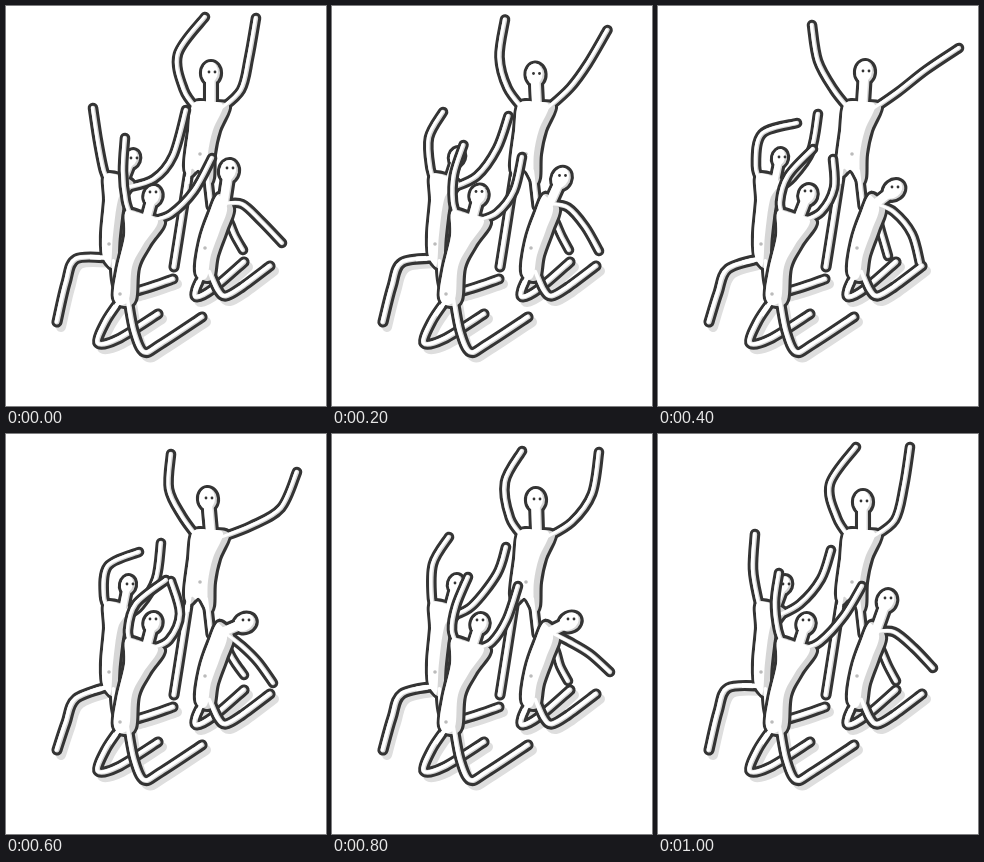
Recreate the animation shown at these times as an HTML page with a canvas. Size 320x400 px, loop 1100 ms.

```html
<!DOCTYPE html>
<html lang="en">
<head>
<meta charset="utf-8">
<title>Dancing figures</title>
<style>
html, body { margin: 0; width: 100%; height: 100%; overflow: hidden; background: #fff; }
canvas { display: block; }
</style>
</head>
<body>
<canvas id="stage" width="320" height="400"></canvas>
<script>
const ctx = document.getElementById('stage').getContext('2d');
const INK = '#343434', GREY = '#d6d6d6', LINE = 3.1, ARM = 4.4, LEG = 5;
const STEP = 100, STEPS = 11;
const KEYS = [0, 1, 3, 4, 6, 8, 10];

// Each pose: head x,y, then three points for the left arm and three for the right.
const back = {
  head: [9, 11], eyes: [1, -1], neck: [205, 98], navel: [194, 148],
  shoulders: [192, 104, 214, 104],
  torso: [187, 98, 183, 125, 179, 160, 184, 170, 193, 164, 202, 178, 207, 172, 208, 148, 213, 125, 223, 100, 205, 96],
  legs: () => [[184, 158, 176, 210, 168, 261], [201, 165, 205, 200]],
  poses: [
    [205, 67, 178, 84, 172, 48, 199, 11, 235, 84, 243, 52, 250, 12],
    [204, 69, 175, 82, 169, 50, 182, 11, 236, 84, 250, 55, 260, 14],
    [203, 68, 176, 82, 166, 52, 164, 16, 240, 80, 262, 60, 291, 34],
    [207, 66, 176, 84, 160, 55, 154, 19, 240, 86, 268, 64, 301, 42],
    [202, 65, 176, 82, 163, 55, 165, 20, 245, 92, 275, 74, 291, 38],
    [204, 66, 178, 84, 173, 48, 190, 17, 240, 88, 260, 60, 267, 18],
    [205, 68, 179, 84, 172, 50, 198, 13, 237, 86, 246, 52, 252, 13]
  ]
};
const left = {
  head: [7, 9], eyes: [2, -1], neck: [117, 176], navel: [103, 238],
  shoulders: [104, 178, 120, 182],
  torso: [100, 168, 99, 195, 96, 230, 98, 253, 110, 262, 113, 230, 118, 195, 127, 176],
  legs: knee => [[104, 252, 70, knee, 60, knee + 24, 51, 316], [108, 255, 112, 283, 130, 285, 167, 273]],
  poses: [
    [126, 153, 98, 165, 92, 135, 87, 102, 148, 173, 167, 150, 180, 104],
    [129, 152, 99, 165, 92, 135, 96, 101, 150, 170, 172, 143, 187, 110],
    [121, 150, 98, 160, 102, 128, 126, 111, 140, 170, 158, 142, 166, 110],
    [122, 152, 98, 160, 104, 128, 139, 117, 134, 172, 153, 145, 160, 108],
    [122, 151, 98, 162, 102, 132, 133, 118, 134, 172, 150, 145, 155, 109],
    [124, 150, 100, 165, 101, 130, 117, 103, 140, 172, 165, 140, 174, 113],
    [126, 151, 100, 165, 95, 135, 97, 100, 142, 170, 163, 145, 173, 116]
  ]
};
const right = {
  head: [9, 11], eyes: [1, -3], neck: [218, 198], navel: [199, 242], armBehind: true,
  shoulders: [218, 205, 218, 198],
  torso: [213, 188, 203, 208, 194, 235, 190, 265, 197, 274, 207, 272, 211, 250, 220, 225, 227, 202],
  legs: () => [[198, 266, 190, 283, 191, 291, 208, 282, 238, 256], [204, 266, 212, 284, 220, 290, 236, 281, 264, 260]],
  poses: [
    [223, 165, 224, 218, 229, 230, 237, 244, 236, 198, 255, 215, 276, 237],
    [224, 165, 224, 215, 230, 228, 238, 242, 234, 198, 252, 217, 271, 240],
    [235, 180, 224, 220, 229, 232, 236, 246, 238, 205, 254, 224, 263, 250],
    [236, 184, 222, 222, 226, 236, 230, 250, 236, 206, 254, 228, 262, 257],
    [239, 189, 224, 220, 230, 230, 238, 241, 236, 212, 252, 228, 267, 249],
    [238, 188, 224, 218, 228, 232, 236, 247, 238, 208, 258, 220, 278, 238],
    [229, 167, 224, 218, 230, 232, 238, 247, 236, 198, 256, 214, 275, 234]
  ]
};
const front = {
  head: [8.5, 10], eyes: [0, -4], neck: [141, 212], navel: [114, 288],
  shoulders: [126, 212, 145, 215],
  torso: [120, 205, 119, 230, 111, 265, 108, 292, 118, 300, 129, 294, 132, 262, 143, 240, 158, 216, 138, 208],
  legs: () => [[115, 293, 100, 315, 92, 337, 112, 333, 152, 308], [122, 293, 128, 325, 138, 346, 155, 338, 196, 311]],
  poses: [
    [147, 190, 120, 195, 117, 165, 119, 132, 165, 208, 188, 185, 206, 152],
    [145, 189, 120, 195, 117, 165, 123, 135, 165, 208, 185, 187, 197, 151],
    [149, 190, 122, 196, 127, 172, 140, 143, 165, 206, 179, 182, 183, 151],
    [150, 189, 122, 196, 130, 170, 155, 143, 163, 206, 176, 182, 175, 153],
    [147, 189, 122, 196, 130, 170, 160, 146, 163, 206, 174, 180, 165, 147],
    [148, 190, 120, 196, 124, 172, 136, 143, 160, 208, 175, 185, 186, 152],
    [148, 190, 120, 196, 117, 168, 121, 139, 162, 208, 186, 182, 204, 152]
  ]
};
const figures = [back, left, right, front];

// Smooth curve through a flat list of x,y pairs.
function curve(xy, closed) {
  const n = xy.length / 2, path = new Path2D();
  const at = i => {
    i = closed ? (i + n) % n : Math.max(0, Math.min(n - 1, i));
    return [xy[2 * i], xy[2 * i + 1]];
  };
  path.moveTo(...at(0));
  for (let i = 0; i < (closed ? n : n - 1); i++) {
    const [a, b, c, d] = [at(i - 1), at(i), at(i + 1), at(i + 2)];
    path.bezierCurveTo(b[0] + (c[0] - a[0]) / 6, b[1] + (c[1] - a[1]) / 6,
      c[0] - (d[0] - b[0]) / 6, c[1] - (d[1] - b[1]) / 6, ...c);
  }
  return path;
}

const limb = (xy, width) => ({ path: curve(xy), width });

function stroke(path, color, width) {
  ctx.strokeStyle = color;
  ctx.lineWidth = width;
  ctx.stroke(path);
}

function fill(path, color) {
  ctx.fillStyle = color;
  ctx.fill(path);
}

// Draws parts merged under one outline, shaded on the right side.
function paint(parts) {
  for (const { path, width } of parts) {
    stroke(path, INK, (width || 0) + 2 * LINE);
    if (!width) fill(path, INK);
  }
  for (const { path, width } of parts) {
    if (width) stroke(path, GREY, width);
    else fill(path, GREY);
  }
  for (const { path, width, shade } of parts) {
    ctx.save();
    if (!width) ctx.clip(path);
    ctx.translate(-(shade || 0.7), width ? -0.3 : -1);
    if (width) stroke(path, '#fff', width - 1.4);
    else fill(path, '#fff');
    ctx.restore();
  }
}

function dot(x, y, r, color) {
  const path = new Path2D();
  path.arc(x, y, r, 0, 7);
  fill(path, color);
}

function poseAt(poses, step) {
  const i = KEYS.findIndex(k => k >= step);
  if (KEYS[i] === step) return poses[i];
  return poses[i].map((v, j) => (v + poses[i - 1][j]) / 2);
}

function drawFigure(f, step, legs) {
  const p = poseAt(f.poses, step), [hx, hy] = p, [nx, ny] = f.neck;
  const arms = [0, 1].map(i =>
    limb([...f.shoulders.slice(2 * i, 2 * i + 2), ...p.slice(2 + 6 * i, 8 + 6 * i)], ARM));
  const head = new Path2D();
  head.ellipse(hx, hy, ...f.head, Math.atan2(hx - nx, ny - hy), 0, 7);
  if (f.armBehind) paint([arms.shift()]);

  const [farLeg, nearLeg] = legs;
  paint([farLeg]);
  paint([
    nearLeg, ...arms, limb([hx, hy, nx, ny], f.head[0] * 1.1),
    { path: curve(f.torso, true), shade: 6 }, { path: head, shade: 2 }
  ]);

  // Open the outline where the far leg meets the hip.
  ctx.save();
  ctx.lineCap = 'butt';
  ctx.setLineDash([20, 999]);
  stroke(farLeg.path, '#fff', LEG - 0.5);
  ctx.restore();

  const ex = hx + f.eyes[0], ey = hy + f.eyes[1];
  dot(ex - 3, ey, 1.4, INK);
  dot(ex + 3, ey, 1.4, INK);
  dot(...f.navel, 1.8, '#bbb');
}

function draw(step) {
  ctx.fillStyle = '#fff';
  ctx.fillRect(0, 0, 320, 400);
  ctx.lineCap = ctx.lineJoin = 'round';
  const knee = 259 - 6 * Math.cos(2 * Math.PI * step / STEPS);
  const legs = figures.map(f => f.legs(knee).map(xy => limb(xy, LEG)));

  ctx.save();
  ctx.translate(4, 5);
  legs.slice(1).flat().forEach(l => stroke(l.path, '#dedede', 10));
  ctx.restore();
  figures.forEach((f, i) => drawFigure(f, step, legs[i]));
}

function tick() {
  draw(Math.floor(performance.now() / STEP) % STEPS);
  requestAnimationFrame(tick);
}
tick();
</script>
</body>
</html>
```
